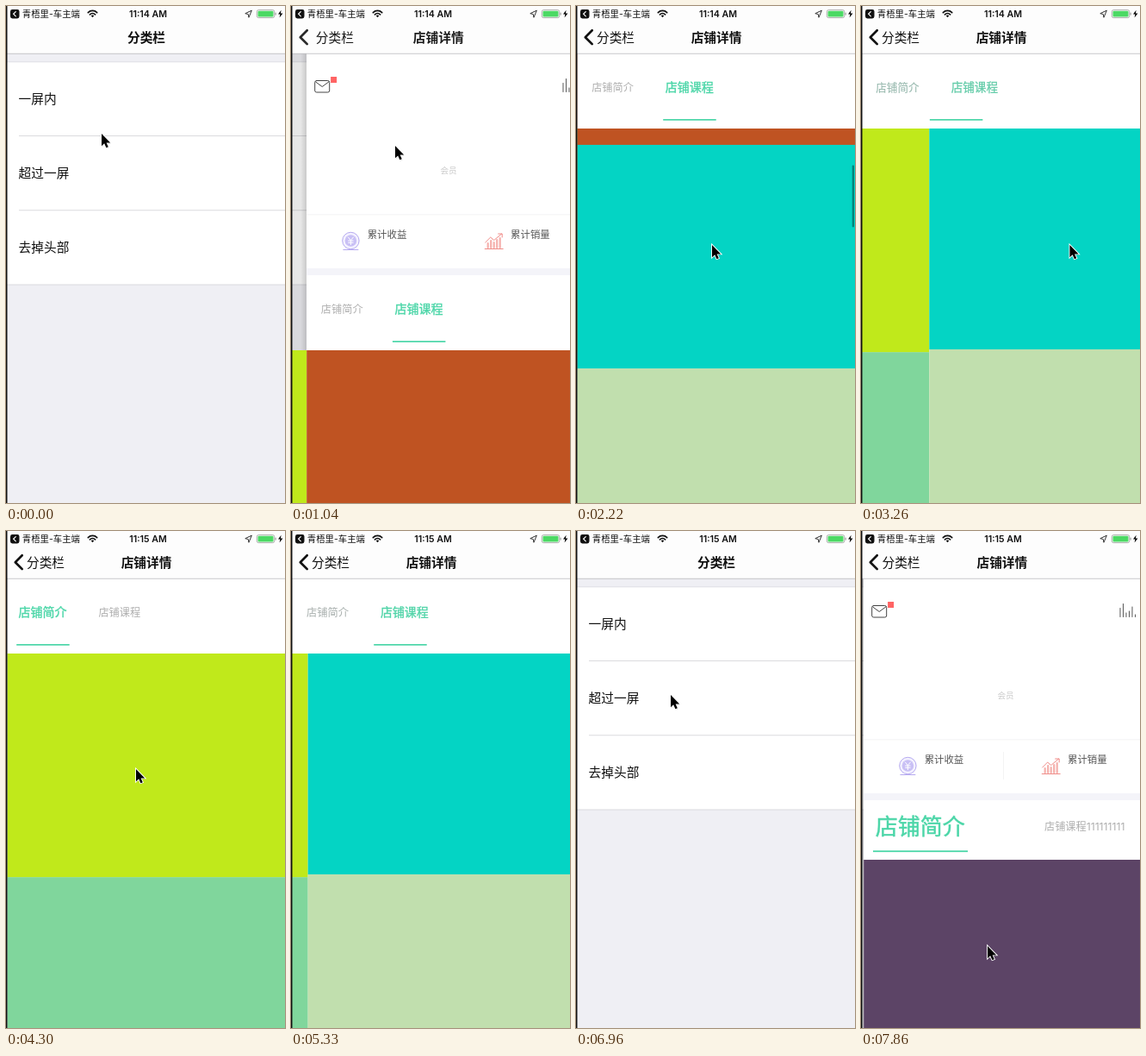
These frames come from a looping animation (324 by 576 pixels, 8 s). An HTML page:

```html
<!DOCTYPE html>
<html lang="zh-CN">
<head>
<meta charset="utf-8">
<title>分类栏</title>
<style>
  html, body { margin: 0; width: 100%; height: 100%; overflow: hidden; background: #fff; }
  svg { display: block; width: 100%; height: 100%; }
  text { font-family: Inter, "Noto Sans CJK SC", "Noto Sans CJK", sans-serif; fill: #111; }
  .mid { text-anchor: middle; }
  .bold { font-weight: 600; }
  .line { fill: none; stroke-linecap: round; stroke-linejoin: round; }
</style>
</head>
<body>
<svg id="stage" viewBox="0 0 324 576" preserveAspectRatio="none"></svg>
<script>
const LOOP = 8000, STEPS = 54, W = 324, EDGE = 1.5;
const STICKY = 257, TAB_TOP = 312, TAB_HEIGHT = 87, CELL = 259.2;
const TEAL = [76, 214, 168], GREY = [174, 174, 174];

// ---- markup helpers ----
const rect = (x, y, w, h, fill, more = '') =>
  `<rect x="${x}" y="${y}" width="${w}" height="${h}" fill="${fill}" ${more}/>`;
const text = (s, x, y, size, more = '') =>
  `<text x="${x}" y="${y + size * 0.38}" font-size="${size}" ${more}>${s}</text>`;
const line = (d, color, width, more = '') =>
  `<path class="line" d="${d}" stroke="${color}" stroke-width="${width}" ${more}/>`;
const cells = (x, colors) =>
  colors.map((c, i) => rect(x, i * CELL, W, CELL + 0.3, c)).join('');
const bars = (x, base, heights, color, width) =>
  line(heights.map((h, i) => `M${x + i * 3.5} ${base}v${-h}`).join(''), color, width);
const tabLabel = (id, s) => `<g id="${id}">${text(s, 0, 0, 12.2, 'class="mid"')}</g>`;

const listView = `
  <g id="list">
    ${rect(0, 55, W + 100, 521, '#efeff4')}
    ${rect(0, 65, W, 258, '#fff')}
    ${rect(0, 64.6, W, 0.6, '#d2d2d6')}
    ${rect(0, 322.6, W, 0.8, '#d2d2d6')}
    ${['一屏内', '超过一屏', '去掉头部'].map((s, i) =>
      text(s, 14.6, 107 + i * 86.4, 14.7) +
      (i ? rect(15, 64 + i * 86.2, W - 15, 0.8, '#d2d2d6') : '')).join('')}
  </g>
  <rect id="shade" y="55" width="324" height="521"/>`;

const sheet = `
  ${rect(EDGE - 7, 55, 7, 521, 'url(#edge)')}
  ${rect(EDGE, 55, W, 521, '#fff')}`;

const headerView = `
  ${rect(EDGE, 55, W, 257, '#fff')}
  ${line('M13 86.5H26a2 2 0 0 1 2 2V98a2 2 0 0 1-2 2H13a2 2 0 0 1-2-2V88.5a2 2 0 0 1 2-2ZM12 88l7.5 5.5L27 88', '#444', 1)}
  ${rect(29.4, 82, 7, 7, '#ff6464')}
  ${bars(299.3, 99.5, [10, 15, 4.5, 6.5, 11.5, 2.5], '#444', 0.9)}
  ${text('会员', 166.3, 190, 9.6, 'class="mid" style="fill:#c8c8c8"')}
  ${rect(EDGE, 241.5, W, 0.8, '#f0f0f2')}
  <circle cx="52.7" cy="272" r="9.7" fill="#f4f2ff" stroke="#b5a9f0"/>
  <circle cx="52.7" cy="272" r="6.8" fill="#c9c0f5"/>
  ${line('M49.7 268l3 3.6 3-3.6M52.7 271.6v5M50 272h5.4M50 274.3h5.4', '#fff', 1)}
  ${line('M44.2 282.5h17', '#b5a9f0', 1.2)}
  ${text('累计收益', 72, 264.3, 11.4, 'style="fill:#555"')}
  ${bars(212, 280, [5, 8, 6, 9, 11], '#f5b0ac', 2.2)}
  ${line('M209 274l6-6 4 3.5 9-7.5M224 264h4.5v4M208.5 281.5h21', '#f08c88', 1)}
  ${text('累计销量', 238.4, 264.3, 11.4, 'style="fill:#555"')}
  ${rect(EDGE, 304, W, 8, '#f4f4f9')}`;

const shopView = `
  <g id="shop">
    ${sheet}
    <g id="pages">
      <g id="pager">
        ${cells(0, ['#c0e91b', '#80d69c'])}
        <g id="table">${cells(W, ['#bf5322', '#04d4c4', '#c1dfae'])}</g>
      </g>
      <rect id="bar" x="320.7" width="2.3" height="72" rx="1.1" fill="#000" fill-opacity=".38"/>
    </g>
    <g id="top">
      ${headerView}
      ${rect(EDGE, TAB_TOP, W, TAB_HEIGHT, '#fff')}
      ${tabLabel('tab0', '店铺简介')}${tabLabel('tab1', '店铺课程')}
      <rect id="mark" y="388" width="61.5" height="1.7" fill="rgb(${TEAL})"/>
    </g>
  </g>`;

const longShopView = `
  <g id="longShop">
    ${sheet}${headerView}
    ${rect(163.4, 256, 0.8, 32, '#f0f0f2')}
    ${text('店铺简介', 15, 342, 26, `style="fill:rgb(${TEAL});stroke:rgb(${TEAL});stroke-width:.5"`)}
    ${text('店铺课程111111111', 211.3, 342, 12.2, 'style="fill:#aeaeae"')}
    ${rect(12.3, 370.3, 110, 1.8, `rgb(${TEAL})`)}
    ${rect(EDGE, 381, W, 195, '#5c4466')}
  </g>`;

const navView = `
  ${rect(0, 0, W, 55, '#fdfdfd')}
  ${rect(0, 54.8, W, 0.8, '#b9b9bd')}
  ${line('M18.7 28.3L10.8 36.2l7.9 7.9', '#111', 2.7, 'id="chevron"')}
  <g id="home">
    ${text('分类栏', 0, 36, 14.7, 'class="mid bold" id="homeTitle"')}
    ${text('分类栏', 0, 36, 14.7, 'class="mid" id="homeBack"')}
  </g>
  <g id="title">${text('店铺详情', 0, 36, 14.7, 'class="mid bold"')}</g>
  ${rect(5, 4, 10.5, 10.5, '#111', 'rx="2.4"')}
  ${line('M11.3 6.6L8.6 9.2l2.7 2.7', '#fff', 1.2)}
  ${text('青梧里-车主端', 18.8, 8.8, 10.4)}
  ${line('M95.3 7.6a7.3 7.3 0 0 1 10.4 0M97.4 9.8a4.4 4.4 0 0 1 6.2 0', '#111', 1.7)}
  <path d="M98.8 11.2a2.5 2.5 0 0 1 3.4 0L100.5 13.2Z"/>
  ${text('', 165, 8.8, 10.6, 'id="clock" class="mid bold"')}
  ${line('M285 5.3l-7.2 3.4 3.5.8.6 3.4Z', '#333', 1)}
  ${rect(291.3, 4.6, 20.4, 9, 'none', 'rx="2" stroke="#9a9a9a" stroke-width=".8"')}
  ${rect(292.5, 5.8, 18, 6.6, '#4cd964', 'rx="1"')}
  ${rect(312.5, 7.5, 1.2, 3.2, '#9a9a9a', 'rx=".6"')}
  <path d="M319.6 4.8l-3.6 4.8h2.4l-.8 3.8 3.8-5h-2.5Z"/>`;

document.getElementById('stage').innerHTML = `
  <defs>
    <linearGradient id="edge">
      <stop offset="0" stop-opacity="0"/><stop offset="1" stop-opacity=".13"/>
    </linearGradient>
  </defs>
  ${listView}${shopView}${longShopView}${navView}
  ${rect(0, 0, EDGE, 576, '#111')}
  <g id="cursor">
    <path d="M.6 1.4V15.2l3.2-2.8 2.2 4.9 2.4-1-2.2-4.8h4.6Z" opacity=".22"/>
    <path d="M0 0V14.2L3.2 11.3 5.4 16.2 7.8 15.2 5.6 10.4H10.2Z" stroke="#fff" stroke-width="1.8" paint-order="stroke"/>
  </g>`;

// ---- motion, in steps of the loop ----
const PUSH = 5.26, POP = 43.43, PUSH_LONG = 50.27;

// pointer moves: start step, end step, x, y
const POINTER = [
  [0, 3, 110, 110], [6, 9.7, 171, 400], [9.7, 12, 171, 254], [12, 15, 158, 277],
  [20, 23, 272, 277], [25, 29, 151, 276], [31, 35, -20, 277], [35, 41, 22, 28],
  [43, 44, 52, 52], [44, 47, 110, 190], [50, 53, 147, 481]];

function ease(n, from, to) {
  const u = Math.min(1, Math.max(0, (n - from) / (to - from)));
  return u * u * (3 - 2 * u);
}

// critically damped navigation spring
function spring(steps) {
  const k = 2.705 * Math.max(0, steps);
  return k > 9 ? 1 : 1 - (1 + k) * Math.exp(-k);
}

const pointer = n => POINTER.reduce(([x, y], [from, to, x2, y2]) => {
  const u = ease(n, from, to);
  return [x + (x2 - x) * u, y + (y2 - y) * u];
}, [111, 148]);

const scrollAt = n => 519.5 * ease(n, 9.687, 15.757);

// short drag, hold, release to the first page, then swipe back
const swipeAt = n =>
  105 * ease(n, 20, 23) + 219 * ease(n, 25, 28.5) - W * ease(n, 30.82, 36.87);

const el = {};
document.querySelectorAll('[id]').forEach(e => el[e.id] = e);
const move = (e, x, y, s = 1) => e.setAttribute('transform', `translate(${x} ${y}) scale(${s})`);
const show = (e, on) => e.style.display = on ? '' : 'none';
const mix = (a, b, u) => `rgb(${a.map((v, i) => Math.round(v + (b[i] - v) * u))})`;

function setTab(e, x, on) {
  move(e, x, 351, 1 + 0.15 * on);
  const style = e.firstChild.style;
  style.fill = style.stroke = mix(GREY, TEAL, on);
  style.strokeWidth = 0.35 * on;
}

function draw(n) {
  const second = n > PUSH_LONG;
  const shown = second ? spring(n - PUSH_LONG) : spring(n - PUSH) - spring(n - POP);
  const x = W * (1 - shown);

  move(el.list, -0.3 * W * shown, 0);
  el.shade.setAttribute('opacity', 0.1 * shown);
  show(el.shop, !second && shown > 0);
  show(el.longShop, second);
  move(el.shop, x, 0);
  move(el.longShop, x, 0);

  const scroll = scrollAt(n), swipe = swipeAt(n), first = swipe / W;
  const lift = Math.min(scroll, STICKY), inner = scroll - lift;
  move(el.top, 0, -lift);
  move(el.pages, 0, TAB_TOP + TAB_HEIGHT - lift);
  move(el.pager, EDGE + swipe - W, 0);
  move(el.table, 0, -inner);
  el.bar.setAttribute('y', 2.5 + inner * 0.166);
  show(el.bar, n >= 10 && n <= 19);
  setTab(el.tab0, 42.5, first);
  setTab(el.tab1, 131.8, 1 - first);
  el.mark.setAttribute('x', 101.2 - 89 * first);

  move(el.home, 163 - 117 * Math.pow(shown, 0.8), 0);
  el.homeTitle.setAttribute('opacity', 1 - shown);
  el.homeBack.setAttribute('opacity', shown);
  el.chevron.setAttribute('opacity', shown * shown);
  move(el.title, 163 + 159 * (1 - shown), 0);
  el.title.setAttribute('opacity', shown);
  el.clock.textContent = n < 27 ? '11:14 AM' : '11:15 AM';
  move(el.cursor, ...pointer(n));
}

const start = performance.now();
function tick() {
  const t = (performance.now() - start) % LOOP;
  draw(Math.min(STEPS - 1, Math.floor((t + 10) * STEPS / LOOP)));
  requestAnimationFrame(tick);
}
tick();
</script>
</body>
</html>
```
